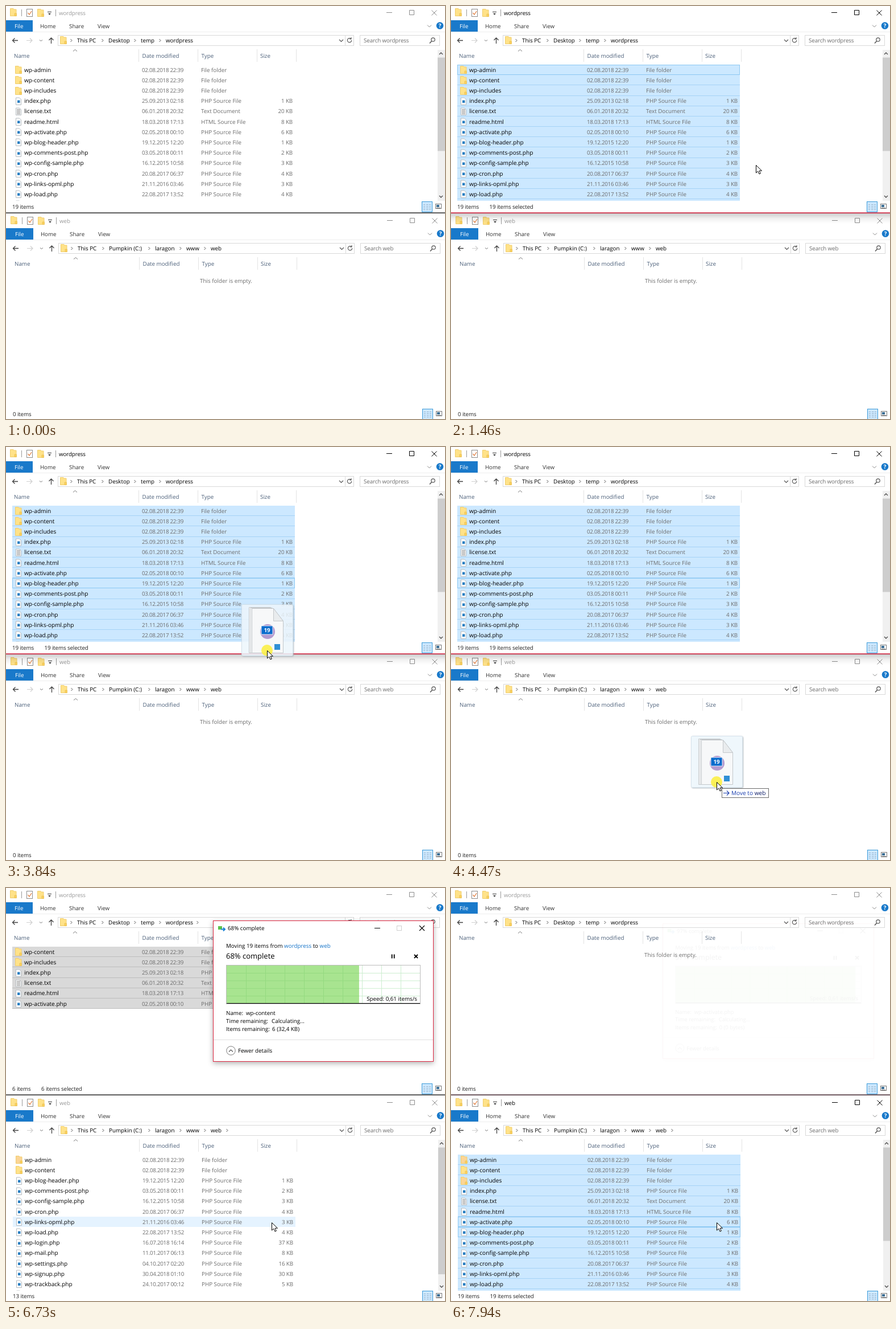
Recreate the animation shown at these times as an HTML page. Size 772 px wide and 725 px high, loop 8000 ms.

```html
<!DOCTYPE html>
<html>
<head>
<meta charset="utf-8">
<title>Moving files between folders</title>
<style>
html, body { margin: 0; width: 100%; height: 100%; overflow: hidden; background: #fff }
svg { display: block }
text { font: 9.8px "Open Sans", "Noto Sans", sans-serif; text-rendering: geometricPrecision; white-space: pre }
.name { font-size: 10.1px }
.date { letter-spacing: -.28px }
.big { font-size: 13px }
.tight { letter-spacing: -.12px }
.end { text-anchor: end }
.mid { text-anchor: middle }
.bold { font-weight: 700 }
</style>
</head>
<body>
<svg width="772" height="725" viewBox="0 0 772 725">
  <linearGradient id="shade" x2="0" y2="1">
    <stop stop-opacity=".2"/><stop offset=".5" stop-opacity=".06"/><stop offset="1" stop-opacity="0"/>
  </linearGradient>
  <g id="stage"></g>
</svg>
<script>
const LOOP = 8000, ROW = 18.17, LIST = 103, GRAY = '#6d6d6d', HEAD = '#4c607a';

const FILES = `wp-admin|02.08.2018 22:39
wp-content|02.08.2018 22:39
wp-includes|02.08.2018 22:39
index.php|25.09.2013 02:18|1
license.txt|06.01.2018 20:32|20
readme.html|18.03.2018 17:13|8
wp-activate.php|02.05.2018 00:10|6
wp-blog-header.php|19.12.2015 12:20|1
wp-comments-post.php|03.05.2018 00:11|2
wp-config-sample.php|16.12.2015 10:58|3
wp-cron.php|20.08.2017 06:37|4
wp-links-opml.php|21.11.2016 03:46|3
wp-load.php|22.08.2017 13:52|4
wp-login.php|16.07.2018 16:14|37
wp-mail.php|11.01.2017 06:13|8
wp-settings.php|04.10.2017 02:20|16
wp-signup.php|30.04.2018 01:10|30
wp-trackback.php|24.10.2017 00:12|5
xmlrpc.php|31.08.2016 18:31|3`.split('\n').map(line => line.split('|'));
const TYPES = { php: 'PHP Source File', txt: 'Text Document', html: 'HTML Source File' };

// Pointer moves: start, end, steps, from x y, to x y
const MOVES = [
  [130, 370, 4, 662, 672, 536, 283],
  [770, 920, 3, 536, 282, 536, 279],
  [2080, 2700, 9, 532, 277, 455, 244],
  [3470, 4230, 11, 456, 252, 465, 550],
  [4300, 4470, 3, 465, 562, 467, 588],
  [6350, 6430, 2, 467, 588, 467, 587]
];

// Dialog values per file moved
const PERCENT = [68, 73, 78, 84, 89, 94, 97];
const LEFT = ['32,4 KB', '32,4 KB', '32,4 KB', '32,0 KB', '12,5 KB', '5,3 KB', '0 bytes'];

const clamp = v => Math.max(0, Math.min(1, v));
const rect = (x, y, w, h, fill, more = '') =>
  `<rect x="${x}" y="${y}" width="${w}" height="${h}" fill="${fill}" ${more}/>`;
const box = (x, y, w, h, stroke, fill = 'none') =>
  rect(x + .5, y + .5, w - 1, h - 1, fill, `stroke="${stroke}"`);
const line = (d, stroke, width = 1, fill = 'none') =>
  `<path d="${d}" fill="${fill}" stroke="${stroke}" stroke-width="${width}"/>`;
const disc = (x, y, r, fill, more = '') => `<circle cx="${x}" cy="${y}" r="${r}" fill="${fill}" ${more}/>`;
const text = (x, y, s, fill = '#000', cls = '') =>
  `<text x="${x}" y="${y + 3.6}" fill="${fill}" class="${cls}">${s}</text>`;
const move = (x, y, s) => `<g transform="translate(${x} ${y})">${s}</g>`;
const repeat = (n, f) => Array.from({ length: n }, (_, i) => f(i)).join('');
const rowTop = i => Math.round(LIST + i * ROW);

function pointer(t) {
  const m = MOVES.filter(m => t >= m[0]).pop();
  if (!m) return null;
  const [t0, t1, n, x0, y0, x1, y1] = m;
  const k = Math.floor(clamp((t - t0) / (t1 - t0)) * (n - 1) + 1e-6) / (n - 1);
  const p = k * k * (3 - 2 * k);
  return [Math.round(x0 + (x1 - x0) * p), Math.round(y0 + (y1 - y0) * p)];
}

const folder = (x, y, fill = '#ffe289') => move(x, y,
  line('M.5 .5H6L7 2H11V13.5H.5Z', '#f0cd6c', 1, fill) + line('M8 13.5V9H11.5V13.5Z', '#e9bf55', .8, '#fbd25f'));

function fileIcon(name, y, tint) {
  if (!name.includes('.')) return folder(16, y - 7, tint);
  const page = line(`M17.5 ${y - 6}h6l3 3v9.5h-9z`, '#b4babf', 1, '#fff');
  return page + (name.endsWith('.txt')
    ? repeat(5, i => line(`M19 ${y - 3.5 + i * 2}h6`, '#8a8a8a', .9))
    : rect(20, y - 1.5, 4.5, 4.5, '#2a7fc1'));
}

function row([name, date, size], i, w) {
  const top = rowTop(i), h = rowTop(i + 1) - top, y = LIST + 9.2 + i * ROW;
  const type = TYPES[name.split('.')[1]] || 'File folder';
  const tint = w.warm && /admin|includes/.test(name) ? '#fbd596' : undefined;
  let s = '';
  if (w.sel) s += rect(11, top, 497, h, w.sel) + rect(11, top + h - 1, 497, 1, w.sep);
  else if (i === w.hover) s += rect(11, top, 497, h, '#e5f3ff');
  return s + fileIcon(name, Math.round(y), tint) + text(32, y, name, '#000', 'name') +
    text(239, y, date, GRAY, 'date') + text(343, y, type, GRAY) +
    (size ? text(504, y, size + ' KB', GRAY, 'end tight') : '');
}

function scrollbar(n) {
  return rect(759, 77, 13, 265, '#f0f0f0') + rect(759, 90.5, 13, 3116 / n, '#cdcdcd') +
    line('M762 85l3-3 3 3M762 333l3 3 3-3', '#505050', 1.4);
}

const chevron = (x, y = 60.5) => line(`M${x - 1.5} ${y - 2.5}l2.5 2.5-2.5 2.5`, '#555');

function explorer(w) {
  const n = w.rows.length, ink = w.active ? '#000' : '#8c8c8c', sy = 352 + w.dy;
  let s = folder(7, 4) + folder(55, 5) + line('M27.5 6V18M87.5 6V18', '#999') +
    box(36, 5, 11, 14, '#8c8c8c', '#fff') + line('M38.5 12l2.5 3 4-6', '#e07a3a', 1.2) +
    line('M73 10.5h7', '#333') + line('M74 13h5l-2.5 2.5z', 'none', 0, '#222') +
    text(93, 12, w.title, w.active ? '#000' : '#999', 'tight') +
    line('M669 11.5h10M709.5 7.5h8v8h-8zM748.5 7.5l9 9M757.5 7.5l-9 9', ink);

  s += rect(-1, 25, 48, 20, '#1979ca') + text(15, 35, 'File', '#fff') + text(60, 35, 'Home', '#333', 'tight') +
    text(111, 35, 'Share', '#333') + text(161, 35, 'View', '#333') + line('M-1 45.5H772', '#eeeeee') +
    line('M741 33.5l3.5 3.5 3.5-3.5', '#888') + disc(763, 34.5, 6.3, '#1979ca') + text(763, 34.5, '?', '#fff', 'mid bold');

  s += line('M21 60.5H11.5M15.5 56.5l-4 4 4 4', '#444', 1.3) + line('M36 60.5h10M42 56.5l4 4-4 4', '#d0d0d0', 1.2) +
    line('M59 59.5l2.5 2 2.5-2', '#777') + line('M79.5 66V56M75.5 60l4-4 4 4', '#444', 1.3) +
    box(91, 51, 521, 19, '#d9d9d9') + line('M596.5 51v18', '#d9d9d9') + folder(95, 53) +
    line('M586 59l3.5 3.5 3.5-3.5', '#555', 1.2) + line('M606.5 57.5a3.7 3.7 0 1 0 1.2 2.5M607 55v3h-3', '#555', 1.1) +
    w.path.map(([x, name]) => chevron(x - 10) + text(x, 60.5, name)).join('') + (w.tail ? chevron(w.tail) : '') +
    box(622, 51, 141, 19, '#d9d9d9') + text(629, 60.5, 'Search ' + w.title, GRAY, 'tight') +
    disc(751, 59, 3.2, 'none', 'stroke="#555" stroke-width="1.2"') + line('M748.6 61.5l-3.6 4', '#555', 1.5);

  s += line('M118 79.5l3.5-3 3.5 3', '#777') + line('M233.5 76V98M337.5 76V98M441.5 76V98M510.5 76V98', '#e3e3e3') +
    text(14, 87, 'Name', HEAD) + text(239.5, 87, 'Date modified', HEAD) + text(343.5, 87, 'Type', HEAD) + text(447, 87, 'Size', HEAD);

  if (n) {
    let list = w.rows.map((f, i) => row(f, i, w)).join('');
    if (w.sel && w.active)
      for (const i of new Set([w.focus, w.hover]))
        if (i >= 0) list += box(11, rowTop(i), 497, rowTop(i + 1) - rowTop(i), '#8cc8f3');
    s += `<svg y="100" width="758" height="242" viewBox="0 100 758 242">${list}</svg>`;
  } else s += text(386, 117, 'This folder is empty.', GRAY, 'mid');
  if (n > 13) s += scrollbar(n);

  const count = w.count ?? n;
  s += text(11, sy, count + ' items', '#222', 'tight');
  if (w.sel && n) s += text(n > 9 ? 67.5 : 62, sy, n + ' items selected', '#222', 'tight');
  return s + move(731, sy - 9, box(0, 0, 19, 19, '#3d9bd8', '#cce8ff') +
    repeat(4, i => line(`M3 ${5.5 + i * 3}h3M8 ${5.5 + i * 3}h3.5M13 ${5.5 + i * 3}h3`, '#7489998c')) +
    box(24, 4, 11, 9, '#777', '#fff') + rect(26, 6, 5, 4, '#3a6d94') + line('M26 11.5h7', '#888'));
}

function dialog(t, stage) {
  const early = t < 6020;
  const pct = early ? 63 : PERCENT[stage];
  const fill = early ? 63.2 : stage ? pct : 63.2 + 5.3 * clamp((Math.floor((t - 6020) / 82) + 1) / 6);
  const name = FILES[early ? 0 : Math.min(stage + 1, 6)][0];
  const left = early ? '7 (32,4 KB)' : `${6 - stage} (${LEFT[stage]})`;
  let s = `<g style="filter:drop-shadow(0 3px 5px rgba(0,0,0,.3))">${box(364, 57, 388, 248, '#dc2640', '#fff')}</g>` +
    rect(373, 67, 7, 6, '#5cc24b') + line('M378 72.5h6M382 69.5l3 3-3 3', '#1c83d4', 2) +
    text(390, 70.5, pct + '% complete') + line('M648 70.5h10M727 66l9 9M736 66l-9 9', '#000', 1.1) +
    box(687, 66, 9, 9, '#d0d0d0');
  s += `<text x="387" y="104.6">Moving 19 items from <tspan fill="#1473c8">wordpress</tspan> to <tspan fill="#1473c8">web</tspan></text>` +
    text(387, 120, pct + '% complete', '#000', 'big') +
    line('M678.7 116.5v7M682.7 116.5v7', '#000', 1.8) + line('M718 117l6 6M724 117l-6 6', '#000', 1.8);
  const grid = color => repeat(9, i => line(`M${422.5 + i * 34} 136V203`, color)) +
    repeat(4, i => line(`M388 ${149.5 + i * 13.4}H728`, color));
  s += rect(388, 136, 340, 67, '#fff') + grid('#cdeed0') + rect(388, 136, fill * 3.4, 67, '#a8e490') +
    `<svg x="388" y="136" width="${fill * 3.4}" height="67" viewBox="388 136 ${fill * 3.4} 67">${grid('#95da80')}</svg>` +
    box(387, 135, 342, 69, '#bcbcbc');
  if (t >= 6430) s += line('M388 202.5H728', '#000', 1.2) +
    text(723, 194.5, `Speed: 0,6${t < 6570 ? 2 : 1} items/s`, '#000', 'end');
  s += text(387, 219, 'Name:') + text(422, 219, name) + text(387, 233, 'Time remaining:') + text(467, 233, 'Calculating...') +
    text(387, 247, 'Items remaining:') + text(468, 247, left) + line('M365 266.5H751', '#dfdfdf') +
    disc(395.5, 285.5, 7.7, '#fff', 'stroke="#777"') + line('M392 287.5l3.5-3.5 3.5 3.5', '#555', 1.1) +
    text(408, 285.5, 'Fewer details');
  if (t < 7770) return s;
  const p = (Math.floor((t - 7770) / 85) + 1) / 3;
  return `<g opacity="${1 - .96 * p}" transform="translate(558 181) scale(${1 - .042 * p}) translate(-558 -181)">${s}</g>`;
}

function dragged(withTip) {
  let s = rect(-44.5, -80.5, 90, 90, '#edf6fc', 'rx="2" opacity=".85" stroke="#cfdee8" style="filter:drop-shadow(1px 1px 1px #a5b0b8)"');
  s += repeat(3, i => line(`M${-31.5 + i * 2.5} ${-75.5 + i}h38l17 22v${58 - i}h-55z`, '#c4c8cb', 1, '#f7f8f9')) +
    line('M11.5 -73.5v22h17z', '#c4c8cb', 1, '#e9ecee') + disc(1, -33, 13, '#b49bd0') +
    rect(-10, -43, 20, 15, '#0a6ccd', 'stroke="#fff" stroke-width=".8"') + text(0, -35.5, '19', '#fff', 'mid bold') +
    rect(13, -11, 10, 10, '#2f8fd6');
  if (withTip) s += box(9, 11, 83, 17, '#6b6b6b', '#fff') + line('M12 19.5h10M18 15.5l4 4-4 4', '#1b3fae', 1.1) +
    `<text x="26" y="23" class="name" fill="#1b3fae">Move to <tspan fill="#0a1a66">web</tspan></text>`;
  return s;
}

const ARROW = line('M.5 .5V14l3.2-3 2.3 5 2.3-1-2.2-4.8H10.5Z', '#000', 1, '#fff');

function hoverRow(tip, dx, dy, n) {
  if (!tip) return -1;
  const x = tip[0] - dx, y = tip[1] - dy, i = Math.floor((y - LIST) / ROW);
  return x > 11 && x < 508 && y < 342 && i < n ? i : -1;
}

function scene(t) {
  const tip = pointer(t);
  const drag = t >= 3470 && t < 4700, press = t >= 770 && t < 920 || t >= 3240 && t < 4700;
  const stage = t < 7030 ? 0 : Math.min(6, Math.floor((t - 7030) / 84) + 1);
  const fromActive = t >= 770 && t < 4700;
  const toActive = t >= 4700 && t < 5700 || t >= 7770;
  const fromRows = t < 5850 ? FILES : FILES.slice(1 + stage, 7);
  const arrived = t < 6730 ? 0 : Math.min(6, stage + 1);
  const toRows = t < 5850 ? [] : FILES.filter((_, i) => i <= arrived || i > 6);

  let s = explorer({
    title: 'wordpress', active: fromActive, dy: 0, rows: fromRows,
    path: [[125, 'This PC'], [180, 'Desktop'], [237, 'temp'], [281, 'wordpress']],
    tail: t >= 6020 && stage < 6 ? 337 : 0,
    sel: t < 1150 ? '' : t < 4700 ? '#cce8ff' : '#d9d9d9', sep: t < 4700 ? '#a6d3f6' : '#bdbdbd',
    focus: t < 3240 ? 0 : 7, hover: t < 3240 ? hoverRow(tip, 0, 0, fromRows.length) : -1
  });
  s += move(1, 365, explorer({
    title: 'web', active: toActive, dy: -1, rows: toRows, warm: true,
    path: [[125, 'This PC'], [180, 'Pumpkin (C:)'], [261, 'laragon'], [316, 'www'], [359, 'web']],
    tail: t >= 6020 ? 388 : 0, count: t < 6730 ? 0 : t < 6880 ? 13 : toRows.length,
    sel: t >= 7620 ? '#cce8ff' : '', sep: '#a6d3f6', focus: 7, hover: hoverRow(tip, 1, 365, toRows.length)
  }));
  s += rect(0, 362.5, 772, 1.5, fromActive ? '#c8102e' : toActive ? '#43262e' : '#2a2a2a');
  if (fromActive) s += rect(0, 364, 772, 18, 'url(#shade)');
  if (t >= 5700) s += dialog(t, stage);
  if (tip) s += move(...tip, (drag ? dragged(tip[1] > 440) : '') +
    (press ? disc(0, 0, 10, '#fbee3c', 'opacity=".85"') : '') + ARROW);
  return s;
}

const stageEl = document.getElementById('stage');
const start = performance.now();
let shown = '';
function frame() {
  const next = scene((performance.now() - start) % LOOP);
  if (next !== shown) stageEl.innerHTML = shown = next;
  requestAnimationFrame(frame);
}
frame();
</script>
</body>
</html>
```
